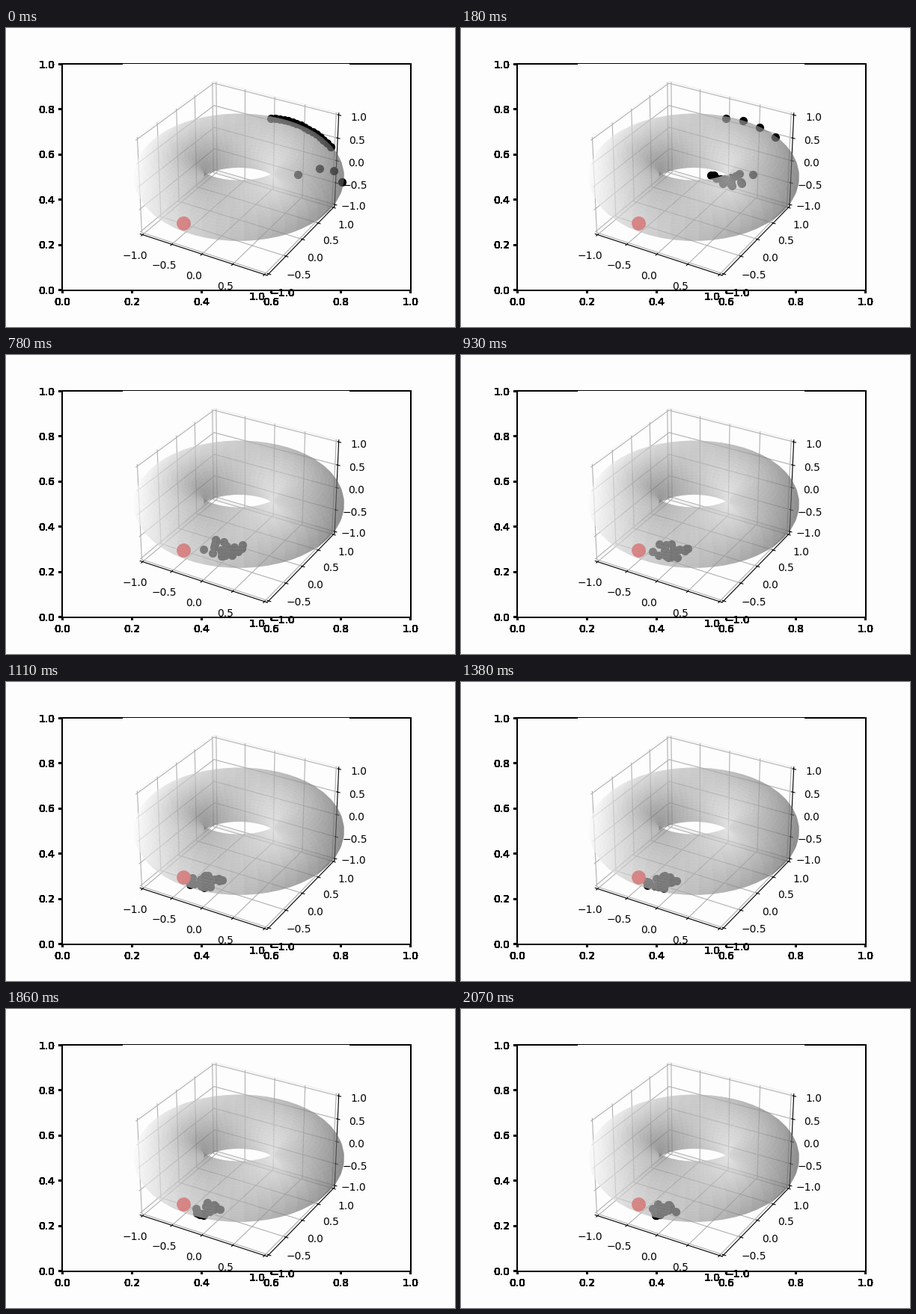
Recreate the animation shown at these times as a matplotlib script. Size 600x400 px, loop 2100 ms.

```python
import numpy as np
import matplotlib.pyplot as plt
from matplotlib.animation import FuncAnimation
from matplotlib.collections import PolyCollection
from matplotlib.patches import Rectangle
from matplotlib.text import Text
from mpl_toolkits.mplot3d import Axes3D  # noqa: F401

W, H, DPI = 600, 400, 100
FRAMES, STEP = 70, 30
LEFT, RIGHT, TOP, BOTTOM = 75, 540, 48, 350
SIDE = BOTTOM - TOP
CUBE_X = (LEFT + RIGHT - SIDE) / 2
LIM = 1 + 1 / 24
PAPER = "#fdfdfd"
ALPHA = 0.45

rng = np.random.default_rng(11)
fig = plt.figure(figsize=(W / DPI, H / DPI), dpi=DPI, facecolor=PAPER)


class HeavyText(Text):
    """Text drawn over itself so that its soft edges turn solid."""

    def draw(self, renderer):
        for _ in range(24):
            super().draw(renderer)


def pixel_axes(zorder):
    ax = fig.add_axes([0, 0, 1, 1], zorder=zorder)
    ax.set(xlim=(0, W), ylim=(H, 0))
    ax.set_axis_off()
    return ax


def block(ax, x, y, w, h, color="black"):
    ax.add_patch(Rectangle((x, y), w, h, fc=color, lw=0, antialiased=False))


def label(ax, x, y, text, ha="center", va="top"):
    ax.add_artist(HeavyText(x, y, text, ha=ha, va=va, fontsize=10,
                            transform=ax.transData))


def project(p):
    """Perspective view of data points: pixel positions and depth."""
    el, az = np.radians([30, -60])
    q = np.asarray(p) * np.array([4, 4, 3]) / 7
    ce, se, ca, sa = np.cos(el), np.sin(el), np.cos(az), np.sin(az)
    right = q @ [-sa, ca, 0]
    up = q @ [-ca * se, -sa * se, ce]
    depth = q @ [ca * ce, sa * ce, se]
    scale = SIDE / 0.185 / (10 - depth)
    shift = SIDE * 0.095 / 0.185
    xy = np.stack([CUBE_X + shift + right * scale,
                   BOTTOM - shift - up * scale], axis=-1)
    return xy, depth


def draw_frame(ax):
    block(ax, LEFT - 1, TOP - 1, RIGHT - LEFT + 3, SIDE + 3)
    block(ax, LEFT + 1, TOP + 1, RIGHT - LEFT - 1, SIDE - 1, PAPER)
    pad = 7 * DPI / 72
    for v in np.linspace(0, 1, 6):
        x = LEFT + v * (RIGHT - LEFT)
        y = BOTTOM - v * SIDE
        block(ax, round(x) - 1, BOTTOM, 3, 5)
        block(ax, LEFT - 5, round(y) - 1, 5, 3)
        label(ax, x, BOTTOM + pad, f"{v:.1f}")
        label(ax, LEFT - pad, y, f"{v:.1f}", "right", "center_baseline")
    # Cube labels turn heavy where they hang below the cube's own background.
    out = LIM + 0.2116
    for spot, text in [((0.5, -out, -out), "0.5"), ((1, -out, -out), "1.0"),
                       ((out, -1, -out), "\u22121.0")]:
        label(ax, *project(spot)[0], text)


def draw_cube():
    box = [CUBE_X / W, 1 - BOTTOM / H, SIDE / W, SIDE / H]
    ax = fig.add_axes(box, projection="3d", zorder=1, facecolor=PAPER)
    ax.view_init(30, -60)
    span = (-LIM, LIM)
    ticks = np.linspace(-1, 1, 5)
    ax.set(xlim=span, ylim=span, zlim=span,
           xticks=ticks, yticks=ticks, zticks=ticks)
    for axis in (ax.xaxis, ax.yaxis, ax.zaxis):
        axis.pane.set_fill(False)


def torus(u, v, ring=1.0, tube=0.5):
    r = ring + tube * np.cos(v)
    return np.stack([r * np.cos(u), r * np.sin(u), tube * np.sin(v)], axis=-1)


def draw_torus(ax, n=50):
    a = np.linspace(0, 2 * np.pi, n + 1)
    u, v = np.meshgrid(a, a, indexing="ij")
    xy, depth = project(torus(u, v))

    def corners(g):
        return np.stack([g[:-1, :-1], g[1:, :-1], g[1:, 1:], g[:-1, 1:]], axis=2)

    quads = corners(xy).reshape(-1, 4, 2)
    order = np.argsort(corners(depth).mean(axis=2).ravel())
    mid = a[:-1] + np.pi / n
    um, vm = np.meshgrid(mid, mid, indexing="ij")
    normal = torus(um, vm, 0, 1)
    lit = normal @ (np.array([-2, -2, 1]) / 3)
    shade = (0.65 + 0.35 * lit).ravel()
    colors = np.column_stack([shade, shade, shade, np.full(n * n, ALPHA)])
    ax.add_collection(PolyCollection(quads[order], facecolors=colors[order],
                                     edgecolors="none", linewidths=0,
                                     antialiaseds=True, zorder=3),
                      autolim=False)


def dots(ax, pts, size, color, zorder):
    return ax.scatter(*np.transpose(pts), s=(size * 72 / DPI) ** 2, c=color,
                      linewidths=0, zorder=zorder)


def bezier(a, b, c, n):
    a, b, c = np.array([a, b, c], float)
    t = np.linspace(0, 1, n)[:, None]
    return (1 - t) ** 2 * a + 2 * t * (1 - t) * b + t ** 2 * c


# Swarm: it starts on the far rim, crosses the ring and settles by the goal.
COUNT = 20
GOAL = (237.3, 260.7)
start = np.vstack([bezier((354, 121), (399, 123), (434, 159), COUNT - 4),
                   bezier((390, 196), (440, 175), (449, 206), 4)])
leave = np.where(np.arange(COUNT) % 4 == 0, 7, 1)  # a few set off late

# Center and half size of the cloud at a few moments.
KEYS = [0, 6, 17, 26, 37, 69]
CENTER = [(385, 357, 318, 290, 267, 268), (190, 201, 219, 259, 267, 268)]
REACH = [(30, 27, 20, 28, 23, 18), (20, 10, 12, 13, 10, 9)]

radius = np.sqrt(rng.random(COUNT))
phase = rng.uniform(0, 2 * np.pi, COUNT)
spin = rng.normal(0, 0.03, COUNT)
jitter = rng.normal(0, 0.8, (FRAMES, COUNT, 2))


def swarm(k):
    at = [np.interp(k, KEYS, row) for row in CENTER]
    reach = [np.interp(k, KEYS, row) for row in REACH]
    angle = phase + spin * k
    disc = radius[:, None] * np.column_stack([np.cos(angle), np.sin(angle)])
    cloud = at + disc * reach + jitter[k]
    f = np.clip((k - leave) / 4, 0, 1)[:, None]
    return start + (cloud - start) * f * f * (3 - 2 * f)


draw_frame(pixel_axes(0))
draw_cube()
front = pixel_axes(2)
particles = dots(front, swarm(0), 11.2, "black", 1)
dots(front, [GOAL], 18.8, "red", 2)
draw_torus(front)
front.set(xlim=(0, W), ylim=(H, 0))


def update(k):
    particles.set_offsets(swarm(k))
    return (particles,)


anim = FuncAnimation(fig, update, frames=FRAMES, interval=STEP,
                     repeat=True, repeat_delay=0, blit=False)
plt.show()
```
